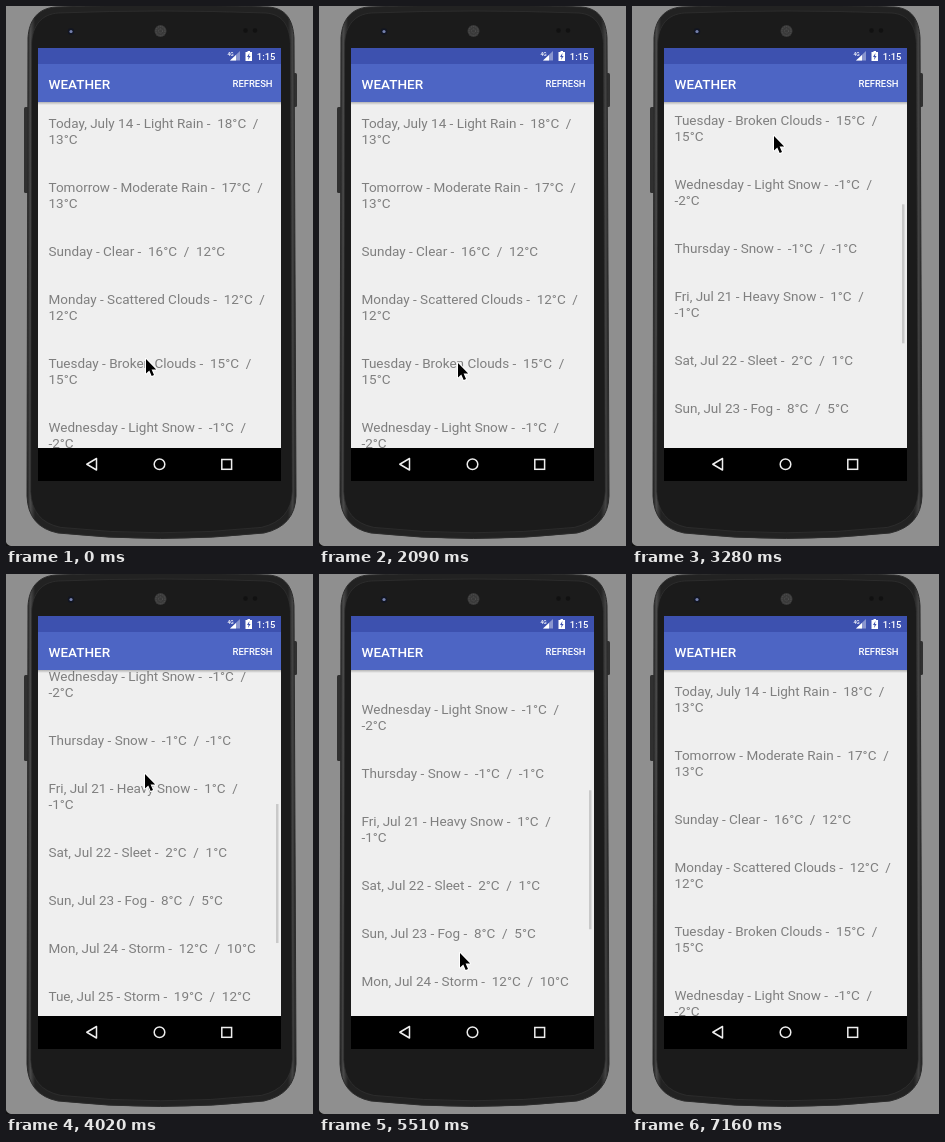
An HTML page for the animation above (7410 ms loop, 307 px wide and 540 px high).

```html
<!DOCTYPE html>
<html lang="en">
<head>
<meta charset="utf-8">
<title>Weather list</title>
<style>
  html, body { margin: 0; width: 100%; height: 100%; overflow: hidden; background: #8f8f8f; }
  svg { display: block; width: 307px; height: 540px; }
  text { font-family: Roboto, sans-serif; white-space: pre; }
  .row { font-size: 13.5px; fill: #7f7f7f; }
  .bold { font-weight: 500; fill: #fff; }
</style>
</head>
<body>
<svg viewBox="0 0 307 540">
  <defs>
    <clipPath id="listClip"><rect x="32" y="96" width="243" height="346"/></clipPath>
    <linearGradient id="shade" x2="0" y2="1">
      <stop stop-color="#000" stop-opacity=".25"/>
      <stop offset="1" stop-color="#000" stop-opacity="0"/>
    </linearGradient>
    <linearGradient id="rim">
      <stop stop-color="#1c1c1c"/>
      <stop offset=".012" stop-color="#4b4b4b"/>
      <stop offset=".03" stop-color="#222"/>
      <stop offset=".97" stop-color="#222"/>
      <stop offset=".988" stop-color="#444"/>
      <stop offset="1" stop-color="#1c1c1c"/>
    </linearGradient>
    <path id="body" d="M50 1Q154 -3 262 1C280 2 287 14 288 32L290 490Q289 520 258 527Q154 538 52 527Q22 521 21 490L22 32C23 14 32 2 50 1Z"/>
  </defs>

  <rect width="307" height="540" fill="#8f8f8f"/>
  <path d="M0 536Q1 539 5 540H0Z" fill="#111"/>
  <rect x="18" y="101" width="5" height="86" rx="1.5" fill="#303030"/>
  <rect x="287" y="67" width="4" height="34" rx="1.5" fill="#303030"/>
  <use href="#body" fill="url(#rim)" stroke="#2c2c2c"/>
  <use href="#body" fill="#1b1b1b" stroke="#333" stroke-width=".7" transform="translate(4.2 6) scale(.973 .978)"/>

  <circle cx="65" cy="25.5" r="3.2" fill="#111522"/>
  <circle cx="65" cy="25.5" r="1.6" fill="#7580ad"/>
  <circle cx="154.500" cy="25" r="6" fill="#3a3a3a"/>
  <circle cx="154.500" cy="25" r="4.500" fill="none" stroke="#555" stroke-dasharray="1 1"/>
  <circle cx="154.500" cy="25" r="2" fill="none" stroke="#555" stroke-dasharray="1 1"/>
  <circle cx="239.500" cy="24.500" r="2.200" fill="#111"/>
  <circle cx="249" cy="24.500" r="2.200" fill="#111"/>

  <rect x="32" y="42" width="243" height="433" fill="#000"/>
  <rect x="32" y="96" width="243" height="346" fill="#efefef"/>
  <g clip-path="url(#listClip)">
    <g id="rows"></g>
    <path id="topGlow" d="M32 96V104Q153.500 122 275 104V96Z" fill="#4d64c3" opacity="0"/>
    <path id="endGlow" d="M32 442V434Q153.500 416 275 434V442Z" fill="#4d64c3" opacity="0"/>
    <rect id="bar" x="270" y="97" width="2.500" height="139" fill="#c9c9c9" opacity="0"/>
    <rect x="32" y="96" width="243" height="3" fill="url(#shade)"/>
  </g>

  <rect x="32" y="42" width="243" height="16" fill="#3d51af"/>
  <rect x="32" y="58" width="243" height="38" fill="#4d65c4"/>
  <text class="bold" x="42.500" y="82.500" font-size="13.500">WEATHER</text>
  <text class="bold" x="226.500" y="81" font-size="9.450">REFRESH</text>
  <text class="bold" x="250.800" y="54" font-size="9.450">1:15</text>
  <text class="bold" x="221.500" y="49.500" font-size="5">4G</text>
  <path d="M224 54.500L234 45V54.500Z" fill="#fff" opacity=".4"/>
  <path d="M224 54.500L230 49V54.500Z" fill="#fff"/>
  <path d="M239.500 46H241.500V45H244V46H246V55H239.500Z" fill="#fff"/>
  <path d="M243.500 47L241 51H242.600L242 54L244.600 50H243Z" fill="#3d51af"/>

  <g fill="none" stroke="#eee" stroke-width="1.500">
    <path d="M90.500 452.500V464L80.800 458.250Z" stroke-linejoin="round"/>
    <circle cx="153.500" cy="458.300" r="5.300"/>
    <rect x="215.800" y="453.500" width="9.800" height="9.800"/>
  </g>

  <path id="cursor" d="M1 1V15.500L4.300 12.400L6.700 18L9 17L6.600 11.600H11.200Z" fill="#000" stroke="#fff" stroke-linejoin="round" paint-order="stroke" stroke-width="2"/>
</svg>
<script>
const LOOP = 7410, TICK = 148.75;
const el = id => document.getElementById(id);

const forecast = [
  'Today, July 14 - Light Rain -  18°C  /|13°C',
  'Tomorrow - Moderate Rain -  17°C  /|13°C',
  'Sunday - Clear -  16°C  /  12°C',
  'Monday - Scattered Clouds -  12°C  /|12°C',
  'Tuesday - Broken Clouds -  15°C  /|15°C',
  'Wednesday - Light Snow -  -1°C  /|-2°C',
  'Thursday - Snow -  -1°C  /  -1°C',
  'Fri, Jul 21 - Heavy Snow -  1°C  /|-1°C',
  'Sat, Jul 22 - Sleet -  2°C  /  1°C',
  'Sun, Jul 23 - Fog -  8°C  /  5°C',
  'Mon, Jul 24 - Storm -  12°C  /  10°C',
  'Tue, Jul 25 - Storm -  19°C  /  12°C',
  'Wed, Jul 26 - Clear -  20°C  /  14°C',
  'Thu, Jul 27 - Clear -  21°C  /  15°C'
];

let baseline = 122;
for (const entry of forecast) {
  for (const line of entry.split('|')) {
    const text = document.createElementNS('http://www.w3.org/2000/svg', 'text');
    text.setAttribute('class', 'row');
    text.setAttribute('x', 42.5);
    text.setAttribute('y', baseline);
    text.textContent = line;
    el('rows').append(text);
    baseline += 16;
  }
  baseline += 32;
}

// Each stop: tick, then values; the picture changes on whole ticks only.
const pointer = [
  [1, 139, 352], [3, 138, 371], [7, 138, 371], [11, 138, 305], [12, 138, 305],
  [14, 138, 356], [15, 138, 356], [16, 138, 366], [17, 139, 350], [20, 140, 210],
  [22, 141, 129], [23, 141, 119], [25, 139, 265], [27, 138, 199], [29, 137, 99],
  [31, 137, 54], [32, 137, 100], [34, 138, 245], [37, 140, 378], [38, 140, 404],
  [39, 141, 380], [41, 145, 192], [42, 150, 190], [44, 232, 347], [45, 232, 347],
  [46, 238, 430], [47, 250, 500], [48, 250, 545]
];
const scroll = [
  [16, 0], [17, 22], [20, 162], [22, 243], [23, 253], [25, 253], [27, 319],
  [29, 419], [34, 419], [37, 286], [38, 255], [39, 150], [40, 40], [41, 0]
];
const barFade = [[16, 0], [17, 1], [42, 1], [44, 0]];
const topFade = [[40, 0], [41, .15], [44, 0]];
const endFade = [[29, 0], [31, .15], [34, 0]];

function at(stops, tick) {
  const next = stops.findIndex(stop => stop[0] >= tick);
  if (next === 0) return stops[0].slice(1);
  if (next < 0) return stops[stops.length - 1].slice(1);
  const a = stops[next - 1], b = stops[next];
  const p = (tick - a[0]) / (b[0] - a[0]);
  return a.slice(1).map((v, i) => v + (b[i + 1] - v) * p);
}

function draw(now) {
  const tick = Math.floor((now % LOOP) / TICK);
  const [x, y] = at(pointer, tick).map(Math.round);
  const offset = Math.round(at(scroll, tick)[0]);
  el('cursor').setAttribute('transform', `translate(${x} ${y})`);
  el('rows').setAttribute('transform', `translate(0 ${-offset})`);
  el('bar').setAttribute('y', 97 + offset * .417);
  el('bar').setAttribute('opacity', at(barFade, tick)[0]);
  el('topGlow').setAttribute('opacity', at(topFade, tick)[0]);
  el('endGlow').setAttribute('opacity', at(endFade, tick)[0]);
}

const start = performance.now();
function loop() {
  draw(performance.now() - start);
  requestAnimationFrame(loop);
}
loop();
</script>
</body>
</html>
```
